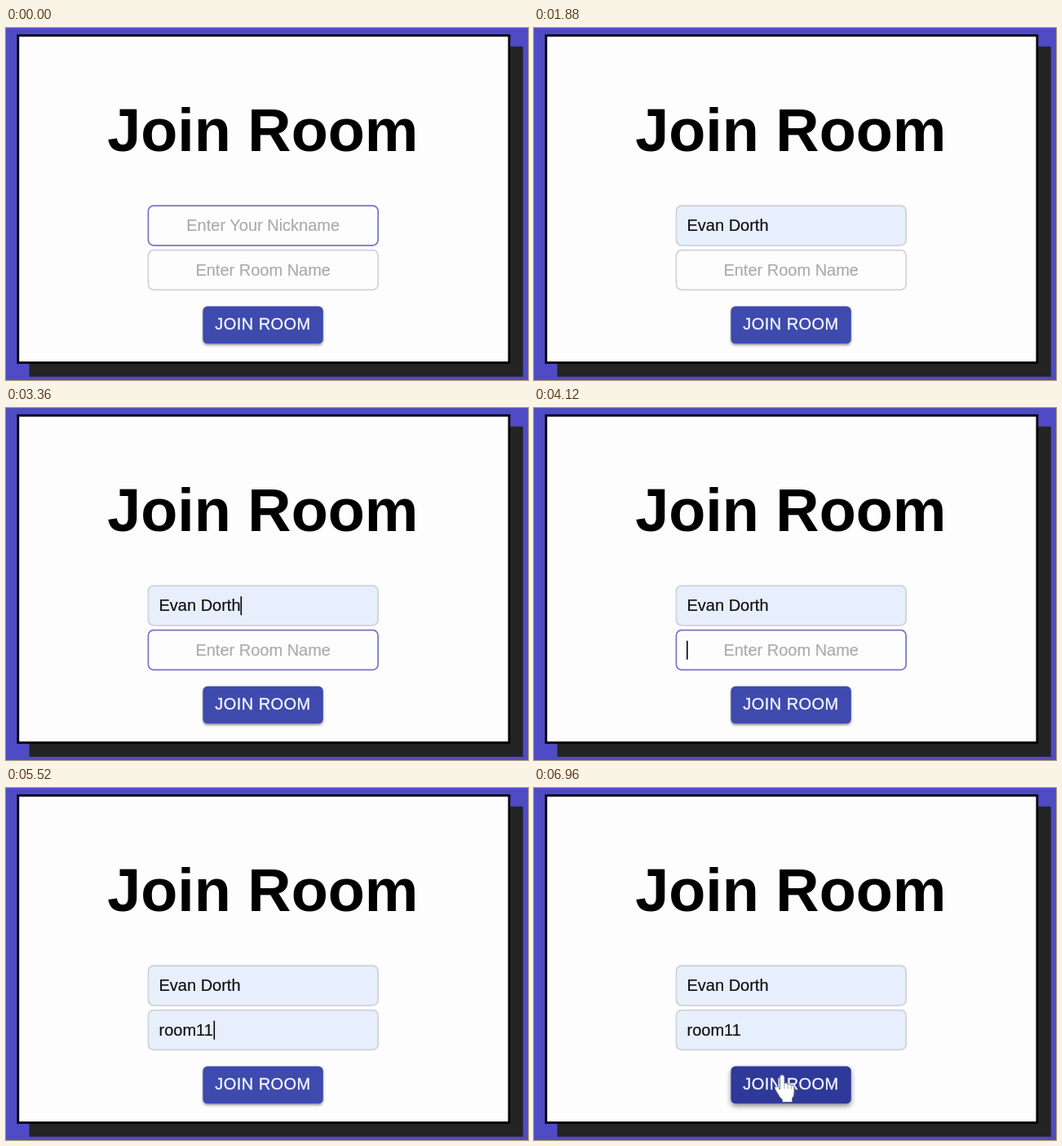
An HTML page that plays this animation: 640x432 px, repeating every 7000 ms.

```html
<!DOCTYPE html>
<html lang="en">
<head>
<meta charset="utf-8">
<title>Join Room</title>
<style>
  html, body { margin: 0; width: 100%; height: 100%; overflow: hidden; background: #4f4bc4; }
  svg { display: block; width: 640px; height: 432px; }
  text { font: 20px "Liberation Sans", Arial, sans-serif; fill: #111; stroke: #111; stroke-width: .2; white-space: pre; }
  .title { font-size: 73.8px; font-weight: bold; fill: #000; stroke: none; text-anchor: middle; }
  .hint { fill: #acacac; stroke: #acacac; text-anchor: middle; }
  .label { fill: #f4f5fb; stroke: #f4f5fb; stroke-width: .35; letter-spacing: .45px; }
  .box { stroke-width: 1.7; }
  .caret { fill: #000; }
  .hand { fill: #fff; stroke: #70758c; stroke-width: 1; stroke-linejoin: round; }
</style>
</head>
<body>
<svg viewBox="0 0 640 432">
  <rect width="640" height="432" fill="#4f4bc4"/>
  <rect x="28.5" y="22.700" width="605.3" height="405.300" fill="#242424"/>
  <rect x="14.800" y="9.200" width="602.100" height="401.500" fill="#fdfdfd" stroke="#000" stroke-width="2.800"/>
  <text class="title" x="314.800" y="151">Join Room</text>
  <g id="fields"></g>
  <rect id="button" x="241.400" y="341.600" width="147.400" height="45.700" rx="5.500"/>
  <text class="label" x="256.300" y="370">JOIN ROOM</text>
  <g id="pointer">
    <path class="hand" d="M6.5 18V3.200Q6.500 0 9.200 0T12 3.200V10.500Q14.500 9 16.200 11.300Q18.800 10.200 20.300 12.700Q24 12 24 16V22Q24 26 21.500 29V33.500H9.500V30.500Q6 27.500 3.500 22.500L.6 17.500Q-.6 15 1.500 14.200Q3.500 13.600 5 15.700Z"/>
    <path d="M12 10.500V17M16.200 11.500V17M20.300 13V17.500" stroke="#a4a7b5" fill="none"/>
  </g>
</svg>
<script>
const LOOP = 7000, BLINK = 500;
const NS = "http://www.w3.org/2000/svg";
const $ = id => document.getElementById(id);

// Each step: [start ms, value]
const FIELDS = [
  {
    y: 218.2, hint: "Enter Your Nickname",
    text: [[0, ""], [1720, "Evan Dorth"]],
    hover: [[0, true], [1720, false]],
    caret: [[0, 0], [1000, 187], [2240, 287.5], [3680, 0]]
  },
  {
    y: 272.7, hint: "Enter Room Name",
    text: [[0, ""], [4400, "cuh1hg7vyr"], [5000, "room11"]],
    hover: [[0, false], [2900, true], [4400, false]],
    caret: [[0, 0], [3680, 187], [5400, 254.5], [5900, 0]]
  }
];
// Fingertip corner: [ms, x, y]
const PATH = [[5920, 289, 345], [6240, 291, 352.5], [6560, 295, 352], [LOOP, 295, 352]];

function add(parent, tag, attrs, text = "") {
  const el = document.createElementNS(NS, tag);
  for (const key in attrs) el.setAttribute(key, attrs[key]);
  el.textContent = text;
  return parent.appendChild(el);
}

for (const f of FIELDS) {
  const base = f.y + 31;
  f.box = add($("fields"), "rect", { class: "box", x: 174.4, y: f.y, width: 281.8, height: 48.6, rx: 6.5 });
  f.hintEl = add($("fields"), "text", { class: "hint", x: 315.2, y: base }, f.hint);
  f.textEl = add($("fields"), "text", { x: 187.5, y: base });
  f.caretEl = add($("fields"), "rect", { class: "caret", y: f.y + 13, width: 1.6, height: 23 });
}

const clamp = v => Math.max(0, Math.min(1, v));
const mix = (a, b, k) => a + (b - a) * k;
const stepAt = (steps, t) => steps.filter(s => s[0] <= t).pop();

function drawField(f, t) {
  const text = stepAt(f.text, t)[1];
  const hover = stepAt(f.hover, t)[1];
  const [since, x] = stepAt(f.caret, t);
  const lit = x > 0 && Math.floor((t - since) / BLINK) % 2 === 0;
  f.box.setAttribute("fill", text ? "#e7eefc" : "#fdfdfd");
  f.box.setAttribute("stroke", hover ? "#7774c4" : "#d0d2d7");
  f.hintEl.style.display = text ? "none" : "";
  f.textEl.textContent = text;
  f.caretEl.setAttribute("x", x);
  f.caretEl.style.display = lit ? "" : "none";
}

function drawButton(t) {
  const k = clamp((t - PATH[0][0]) / 250);
  const rgb = [mix(62, 47, k), mix(74, 57, k), mix(174, 153, k)].map(Math.round);
  $("button").setAttribute("fill", `rgb(${rgb})`);
  $("button").style.filter =
    `drop-shadow(0 ${mix(2, 3, k)}px ${mix(1.6, 3.2, k)}px rgba(0,0,0,${mix(.4, .45, k)}))`;
}

function drawPointer(t) {
  const i = PATH.findIndex(p => p[0] > t);
  $("pointer").style.display = i > 0 ? "" : "none";
  if (i < 1) return;
  const [a, b] = [PATH[i - 1], PATH[i]];
  const u = (t - a[0]) / (b[0] - a[0]);
  const k = u * u * (3 - 2 * u);
  $("pointer").setAttribute("transform", `translate(${mix(a[1], b[1], k)} ${mix(a[2], b[2], k)})`);
}

function draw(t) {
  for (const f of FIELDS) drawField(f, t);
  drawButton(t);
  drawPointer(t);
}

const start = performance.now();
function tick() {
  draw((performance.now() - start) % LOOP);
  requestAnimationFrame(tick);
}
draw(0);
requestAnimationFrame(tick);
</script>
</body>
</html>
```
